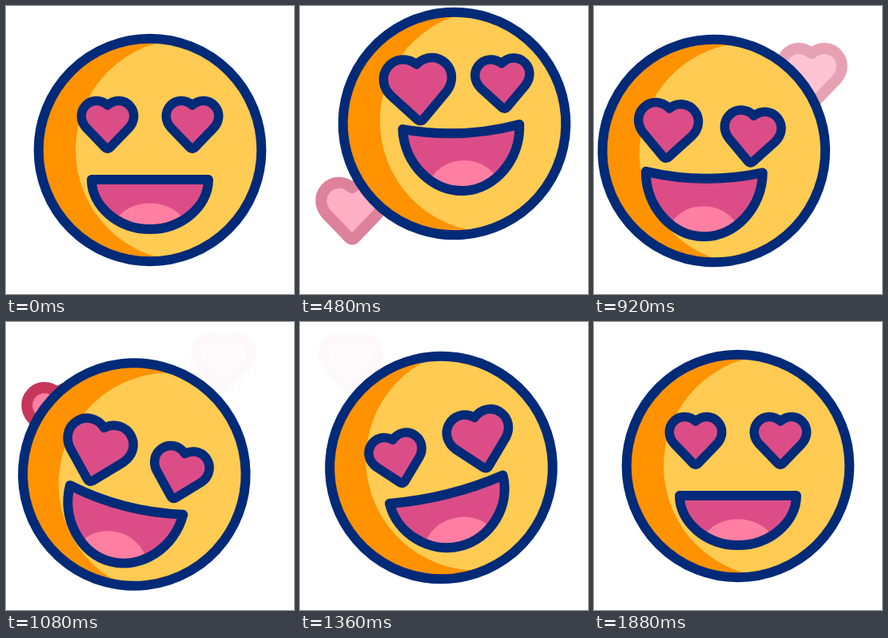
An HTML page with a canvas for the animation above (2 s loop, 360 by 360 pixels).

```html
<!DOCTYPE html>
<html lang="en">
<head>
<meta charset="utf-8">
<title>Heart eyes</title>
<style>
  html, body { margin: 0; width: 100%; height: 100%; overflow: hidden; background: #fff; }
  canvas { display: block; width: 360px; height: 360px; }
</style>
</head>
<body>
<canvas id="stage" width="360" height="360"></canvas>
<script>
const ctx = document.getElementById('stage').getContext('2d');
const LOOP = 2000, STEP = 40;
const NAVY = '#012a78', YELLOW = '#ffcb52', ORANGE = '#ff9200';
const PINK = '#dc4d87', TONGUE = '#ff7fa2';

const heart = new Path2D('M0-24C-9-32-21-31-28-23C-35-15-34-4-27 4L-3 29Q0 32 3 29L27 4C34-4 35-15 28-23C21-31 9-32 0-24Z');

// time, face centre x, y
const path = [
  [0, 180, 180], [280, 199, 165], [380, 203, 154], [480, 193, 147],
  [600, 179, 148.5], [720, 159.5, 162], [880, 149, 178], [1080, 160.3, 190.5],
  [1160, 167, 191], [1360, 176.5, 182], [1800, 180, 180]
];

// time, turn, eyes x, y, left and right eye scale, mouth x, y, tilt, depth, sag
const poses = [
  [0, 0, 0, -32, 1, 1, 0, 37, 0, 62, 0],
  [280, 18, 15, -40, 1.08, 1.22, 13, 9.5, -3, 79, 7],
  [480, -4, 11, -46, 1.3, 1.04, 8, 4.6, 1.6, 80, 8],
  [720, -14, -13, -32, 0.98, 1.12, -18, 16.6, -6.3, 81, 8],
  [1080, 15, 1.5, -16, 1.27, 1.06, -1, 33.4, -0.5, 79.5, 8],
  [1360, -13, 1.8, -23, 1.02, 1.19, 0, 28, -1, 73, 6],
  [1800, 0, 0, -32, 1, 1, 0, 37, 0, 62, 0]
];

// age, scale, opacity
const life = [[0, 0, 1], [45, 1.02, 1], [125, 1.1, 1], [200, 1.12, 0.6], [415, 1, 0.03]];
const floaters = [
  { x: 65, y: 301, start: 285 },
  { x: 272, y: 143, start: 680 },
  { x: 64, y: 144, start: 960 }
];

// Smooth curve through the keys, at rest at both ends
function sample(keys, t) {
  const last = keys.length - 1;
  if (t >= keys[last][0]) return keys[last].slice(1);
  let i = 0;
  while (t >= keys[i + 1][0]) i++;
  const a = keys[i], b = keys[i + 1], span = b[0] - a[0], u = (t - a[0]) / span;
  const slope = (k, c) => k === 0 || k === last ? 0 :
    (keys[k + 1][c] - keys[k - 1][c]) / (keys[k + 1][0] - keys[k - 1][0]);
  const blend = u * u * (3 - 2 * u);
  return a.slice(1).map((v, n) => {
    const c = n + 1;
    return v + (b[c] - v) * blend
      + span * u * (1 - u) * ((1 - u) * slope(i, c) - u * slope(i + 1, c));
  });
}

function tint(rgb, alpha) {
  return `rgb(${rgb.map(v => Math.round(255 + (v - 255) * alpha)).join(',')})`;
}

function at(x, y, deg, draw) {
  ctx.save();
  ctx.translate(x, y);
  ctx.rotate(deg * Math.PI / 180);
  draw();
  ctx.restore();
}

function disc(x, y, rx, ry, color) {
  ctx.beginPath();
  ctx.ellipse(x, y, rx, ry, 0, 0, 2 * Math.PI);
  ctx.fillStyle = color;
  ctx.fill();
}

function drawHeart(x, y, scale, fill, line, width) {
  if (scale <= 0) return;
  at(x, y, 0, () => {
    ctx.scale(scale, scale);
    ctx.lineWidth = width / scale;
    ctx.fillStyle = fill;
    ctx.strokeStyle = line;
    ctx.fill(heart);
    ctx.stroke(heart);
  });
}

function drawFloater(f, t) {
  const age = t - f.start;
  if (age < 0 || age > 415) return;
  const [scale, opacity] = sample(life, age);
  const alpha = Math.max(0, Math.min(1, opacity));
  const size = scale * 1.05;
  drawHeart(f.x, f.y - age * 0.233, size,
    tint([255, 127, 160], alpha), tint([200, 53, 91], alpha), 12 * size);
}

function drawMouth(depth, sag) {
  const w = 73, k = 0.54;
  const shape = new Path2D();
  shape.moveTo(-w, 0);
  shape.quadraticCurveTo(0, 2 * sag, w, 0);
  shape.bezierCurveTo(w, depth * k, w * k, depth, 0, depth);
  shape.bezierCurveTo(-w * k, depth, -w, depth * k, -w, 0);
  shape.closePath();
  ctx.fillStyle = PINK;
  ctx.fill(shape);
  ctx.save();
  ctx.clip(shape);
  disc(0, depth, 45, 14 + 0.3 * depth, TONGUE);
  ctx.restore();
  ctx.lineWidth = 12;
  ctx.strokeStyle = NAVY;
  ctx.stroke(shape);
}

function drawFace(t) {
  const [x, y] = sample(path, t);
  const [turn, ex, ey, left, right, mx, my, tilt, depth, sag] = sample(poses, t);
  at(x, y, turn, () => {
    disc(0, 0, 139, 139, ORANGE);
    ctx.save();
    ctx.clip();
    disc(46, 0, 139, 139, YELLOW);
    ctx.restore();
    ctx.beginPath();
    ctx.arc(0, 0, 139.3, 0, 2 * Math.PI);
    ctx.lineWidth = 12;
    ctx.strokeStyle = NAVY;
    ctx.stroke();
    at(mx, my, tilt, () => drawMouth(depth, sag));
    drawHeart(ex - 53, ey, left, PINK, NAVY, 11.5);
    drawHeart(ex + 53, ey, right, PINK, NAVY, 11.5);
  });
}

const begin = performance.now();
function frame() {
  const now = (performance.now() - begin) % LOOP;
  const t = Math.floor(now / STEP) * STEP;
  ctx.fillStyle = '#fff';
  ctx.fillRect(0, 0, 360, 360);
  ctx.lineJoin = 'round';
  floaters.forEach(f => drawFloater(f, t));
  drawFace(t);
  requestAnimationFrame(frame);
}
frame();
</script>
</body>
</html>
```
